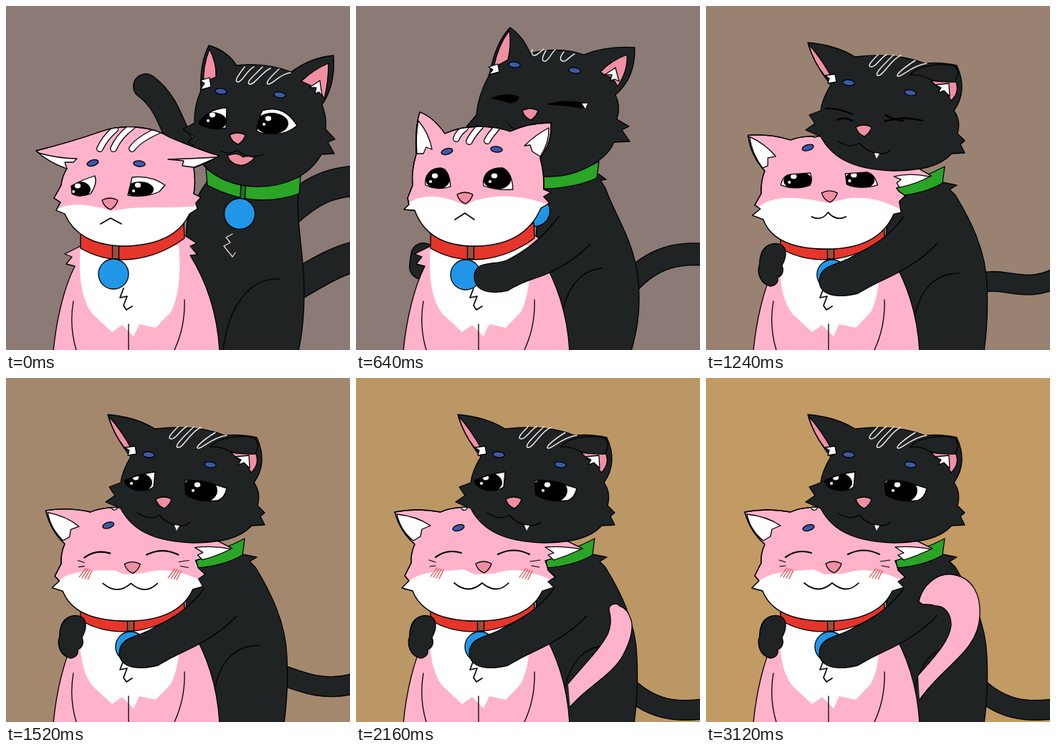
Write an HTML page with a canvas that moves like this. It is 480 px wide and 480 px high and loops after 3.2 s.

```html
<!DOCTYPE html>
<html lang="en">
<head>
<meta charset="utf-8">
<title>Cat hug</title>
<style>
html, body { margin: 0; width: 100%; height: 100%; overflow: hidden; }
canvas { display: block; width: 100vw; height: 100vh; object-fit: contain; }
</style>
</head>
<body>
<canvas id="stage" width="480" height="480"></canvas>
<script>
const g = document.getElementById('stage').getContext('2d');
const LOOP = 3200;
const PINK = '#ffb3ca', ROSE = '#f08fa3', INK = '#1f2324', WHITE = '#fff', LINE = '#000',
  RED = '#e6352a', GREEN = '#2aa526', BLUE = '#2196e8', BROW = '#3c59a8';
const NUM = /-?\d+(\.\d+)?/g;
const HUG = [0, 320, 640, 1160];       // poses of the black cat
const CHEER = [520, 640, 1160, 1720];  // poses of the pink cat
let t = 0;

const smooth = x => x * x * (3 - 2 * x);
const span = (a, b) => Math.min(1, Math.max(0, (t - a) / (b - a)));

// Blends the pose strings, number by number, at the current time.
function pose(times, ...forms) {
  let i = 0;
  while (i < times.length - 2 && t > times[i + 1]) i++;
  const k = smooth(span(times[i], times[i + 1]));
  const to = forms[i + 1].match(NUM);
  let n = 0;
  return forms[i].replace(NUM, v => ' ' + (+v + (to[n++] - v) * k).toFixed(2));
}
const hug = (...forms) => pose(HUG, ...forms);
const cheer = (...forms) => pose(CHEER, ...forms);
const nums = s => s.match(NUM).map(Number);

function shape(d, fill, line = LINE, width = 1.3) {
  const p = new Path2D(d);
  if (fill) { g.fillStyle = fill; g.fill(p); }
  if (line) { g.strokeStyle = line; g.lineWidth = width; g.stroke(p); }
}
const stroke = (d, color = LINE, width = 1.3) => shape(d, null, color, width);
function band(d, width, fill) {
  stroke(d, LINE, width);
  stroke(d, fill, width - 2.6);
}
function oval(x, y, rx, ry, fill, line, tilt = 0) {
  g.beginPath();
  g.ellipse(x, y, rx, ry, tilt, 0, 7);
  g.fillStyle = fill;
  g.fill();
  if (line) { g.strokeStyle = line; g.lineWidth = 1.3; g.stroke(); }
}
function inside(d, draw) {
  g.save();
  g.clip(new Path2D(d));
  draw();
  g.restore();
}
function shifted(x, y, draw) {
  g.save();
  g.translate(x, y);
  draw();
  g.restore();
}
function eye(lens, x, y, rx, ry, hx, hy) {
  inside(lens, () => {
    shape(lens, WHITE, null);
    oval(x, y, rx, ry, LINE);
    oval(hx, hy, 4.2, 3.4, WHITE);
    oval(hx - 6, hy + 8, 2.1, 2.1, WHITE);
  });
  stroke(lens);
}
const nose = (x, y) =>
  shape(`M${x - 11} ${y - 4}q11-6 22 0q-2 8-10 13q-9-3-12-13z`, ROSE);
function brow(place, tilt) {
  const [x, y] = nums(place);
  oval(x, y, 8.2, 4, BROW, LINE, tilt);
}

function blackBody() {
  band(hug('M195 112C220 130 228 155 245 195', 'M86 246C120 240 150 245 200 270',
    'M94 348C93 355 92 360 92 364', 'M94 350C93 355 92 360 92 366'), 36, INK);
  const w = nums(hug('43', '33', '32', '29'))[0];
  const tail = pose([0, 320, 640, 1240, 1760, 2200],
    'M395 395C430 375 460 355 490 349C540 340 560 250 500 243C460 245 430 250 380 300',
    'M385 402C420 377 445 371 500 380C540 380 560 390 580 390C580 390 580 390 580 390',
    'M380 388C415 350 450 342 500 348C540 348 560 350 580 350C580 350 580 350 580 350',
    'M370 392C410 370 440 405 490 379C540 360 560 350 580 350C580 350 580 350 580 350',
    'M370 422C410 466 450 467 490 461C540 457 560 450 580 450C580 450 580 450 580 450',
    'M370 422C410 466 450 467 490 461C540 457 560 450 580 450C580 450 580 450 580 450');
  band(tail, w, INK);
  if (t < 200) arm();
  shape(hug(
    'M284 240L408 250L410 252L409 256L408 260C405 290 412 330 415 370C418 420 414 455 408 482L270 482C250 400 250 320 253 300Q262 270 284 240Z',
    'M265 250L393 258L419 263L408 264L412 268C405 280 400 330 408 370C414 420 411 455 406 482L270 482C250 400 245 320 240 300Q250 270 265 250Z',
    'M262 240L335 232L349 242L341 243L348 254C360 290 390 330 394 385C398 430 390 460 384 482L270 482C250 400 250 320 253 300Q255 270 262 240Z',
    'M262 240L330 246L350 250L340 256L348 264C367 295 391 340 392 390C394 430 391 460 388 482L270 482C250 400 250 320 253 300Q255 270 262 240Z'), INK);
  stroke(hug('M303 480C310 420 340 378 382 381', 'M300 475C305 420 335 374 374 376',
    'M288 430C295 390 315 368 344 366', 'M292 430C300 395 320 373 353 373'));
  stroke(hug('M316 318L307 323L313 330L304 335L316 350L320 344',
    'M302 328L294 334L299 339L292 344L303 356L305 350',
    'M260 328L252 334L257 339L250 344L261 356L263 350',
    'M240 328L232 334L237 339L230 344L241 356L243 350'), '#ddd', 1.3);
  shape(hug('M279 227Q340 268 411 238L409 262Q345 284 281 250Z',
    'M263 241Q320 278 395 250L391 266Q330 292 266 262Z',
    'M262 238Q300 238 339 217L336 240Q305 254 262 255Z',
    'M265 246Q300 242 333 224L330 247Q305 262 266 265Z'), GREEN);
  const strap = hug('M331 252L330 269', 'M311 263L310 278', 'M250 240L249 258', 'M240 248L239 264');
  stroke(strap, LINE, 8);
  stroke(strap, '#187a22', 5);
  const [x, y] = nums(hug('326 290', '314 300', '249 286', '230 300'));
  oval(x, y, 21.5, 21.5, BLUE, LINE);
}

function blackFace() {
  const [x, y] = nums(hug('323 184', '308 194', '243 150', '220 173'));
  if (t < 480) shifted(x - 323, y - 184, () => {
    eye('M268 164Q282 143 308 142L307 170Q285 175 268 164Z', 287, 161, 21, 13, 288, 152);
    eye('M350 173Q352 155 358 146Q388 137 406 167Q390 181 368 178Q352 178 350 173Z', 371, 164, 23, 15, 366, 157);
    if (t < 200) {
      shape('M309 209Q322 203 331 211Q340 208 347 212Q335 224 325 222Q313 220 309 209Z', ROSE);
      stroke('M299 202Q312 209 323 201Q336 215 360 207');
    } else {
      shape('M309 209Q320 210 325 203Q337 217 358 208Q352 225 345 231Q328 237 317 230Q308 222 309 209Z', ROSE);
      shape('M312 209l3 9 4-9zM345 211l-2 9-5-8zM318 230l2-8 6 11zM335 234l3-8 4 6z', WHITE, LINE, 0.8);
    }
  });
  else if (t < 900) shifted(x - 243, y - 150, () => {
    shape('M189 129Q210 120 228 127Q222 136 214 135Q202 130 189 129Z', LINE);
    shape('M268 137Q295 130 318 136Q322 140 316 142Q290 138 268 137Z', LINE);
    shape('M315 136l8 0-3 7z', WHITE, null);
    stroke('M212 164Q220 176 238 170Q250 180 266 174');
  });
  else shifted(x - 220, y - 173, () => {
    if (t < 1500) {
      stroke('M167 143Q184 142 204 151M204 160Q192 154 183 159M250 152Q264 160 275 160M250 161Q275 153 302 160', LINE, 2.4);
    } else {
      eye('M165 143Q185 134 208 131L206 152Q198 158 186 157Q168 155 165 143Z', 183, 146, 21, 14, 181, 139);
      eye('M250 143Q275 141 295 150L308 154Q305 168 295 171Q265 174 251 163Q249 152 250 143Z', 270, 157, 25, 18, 267, 149);
    }
    stroke('M183 188Q201 200 214 191Q226 206 246 206Q254 205 257 201');
    shape('M235 205l3 8 4-7z', WHITE, null);
  });
  nose(x, y);
}

function blackHead() {
  shape(hug(
    'M272 118Q270 80 283 55Q308 62 322 83Q360 78 398 92Q425 72 457 69Q460 110 441 138Q448 155 446 172L459 186L449 190L458 206L440 207C425 235 390 254 345 252C300 249 268 225 262 195L254 190L262 182L247 172L263 163Q262 140 272 118Z',
    'M258 130Q260 85 275 64Q298 72 310 97Q345 90 384 104Q415 82 451 77Q452 120 427 150Q434 165 432 185L447 196L437 203L446 214L427 217C410 248 375 264 330 262C290 260 262 240 255 200L243 186L248 181L226 173L247 168Q248 150 258 130Z',
    'M186 96Q195 50 215 30Q233 42 243 66Q285 56 318 68Q350 55 389 58Q390 100 362 124Q370 140 364 158L381 168L371 173L382 189L360 190C350 215 310 238 270 238C215 235 195 215 180 190L164 182L170 175L152 171L168 152Q170 125 186 96Z',
    'M174 110Q150 80 142 51Q180 54 208 71Q265 64 305 80Q330 78 350 83Q366 118 346 146Q356 160 351 178L361 188L355 193L361 205L343 206C325 225 300 229 262 230C215 229 178 217 160 182L139 173L152 164L144 152L160 146Q162 130 174 110Z'), INK);
  shape(hug('M284 60Q294 80 293 99L283 103L276 112Q274 85 284 60Z',
    'M275 68Q280 95 277 112L268 116L260 124Q262 92 275 68Z',
    'M214 34Q217 55 212 75L203 80L192 86Q198 55 214 34Z',
    'M143 53Q160 72 174 97L172 100L166 98Q150 78 143 53Z'), ROSE);
  shape(hug('M284 100l-13 4l6 4l-6 9l15 -4z', 'M266 113l-13 4l6 4l-6 9l15 -4z',
    'M198 81l-13 4l6 4l-6 7l15 -4z', 'M180 95l-14 2l6 4l-2 7l12 -2z'), WHITE);
  shape(hug('M450 80Q430 88 412 105L428 112L437 116L444 130Q450 105 450 80Z',
    'M440 90Q420 100 404 115L414 122L422 128L430 140Q440 115 440 90Z',
    'M378 68Q356 76 341 92L350 98L358 100L365 112Q380 90 378 68Z',
    'M348 104Q330 106 314 104L322 112L335 120L342 132Q355 120 348 104Z'), ROSE);
  shape(hug('M438 104l-15 10l10 0l-2 8l6 -2l4 6z', 'M424 118l-15 10l10 0l-2 8l6 -2l4 6z',
    'M362 86l-15 10l10 0l-2 8l6 -2l6 3z', 'M339 108l-19 2l8 4l-4 7l8 -3l8 8z'), WHITE);
  if (t > 900) shape('M285 96C296 82 330 79 347 84C354 92 352 99 347 106Q318 107 306 99Q295 95 285 96Z', INK);
  stroke(hug(
    'M333 85c-11 14 -15 21 -9 21s13 -18 22 -21M358 85c-14 14 -24 22 -18 24s18 -18 29 -22M381 88c-13 12 -20 20 -15 21s17 -15 31 -16',
    'M318 97c-11 14 -15 20 -9 20s13 -17 22 -20M343 97c-14 14 -24 21 -18 22s18 -18 29 -20M366 100c-13 12 -20 20 -15 21s17 -15 31 -16',
    'M246 61c-2 6 1 10 6 7s6 -5 10 -8M265 62c-6 10 -6 16 -1 15s8 -11 14 -16M290 64c-6 7 -6 12 -1 13s9 -7 16 -10',
    'M240 68c-10 10 -16 17 -9 17s13 -14 21 -17M262 68c-16 16 -28 27 -22 29s19 -24 32 -28M292 76c-16 10 -29 21 -24 22s19 -15 40 -18'), '#e8e8e8', 1.5);
  brow(hug('300 119', '288 121', '221 82', '199 107'), 0.1);
  brow(hug('382 124', '370 127', '305 90', '285 121'), 0.15);
  blackFace();
}

function pinkBody() {
  const left = 'M104 335L82 346L92 350L84 360L96 363C80 395 70 440 66 482';
  const right = 'C295 430 280 385 257 348L267 347L257 335L266 331L249 320';
  shape(left + 'L298 482' + right, PINK);
  shape('M104 336C100 385 108 415 122 431L148 455L162 445L178 461L186 444L209 449L230 427C243 402 244 365 241 334Z', WHITE, null);
  stroke('M94 412C90 435 92 460 98 480M171 444L171 480M249 410C250 440 242 465 235 480');
  stroke('M164 394L159 407L169 405L164 418L168 424L176 419', LINE, 1.7);
  shape('M104 317C140 336 205 338 248 302L249 324C200 360 145 362 104 338Z', RED);
  const [strap, x, y] = nums(cheer('153 150 374', '160 153 375', '174 176 375', '174 173 375'));
  shape(`M${strap - 4.5} 334h9v19h-9z`, '#95523f');
  oval(x, y, 21, 21, BLUE, LINE);
}

function pinkFace() {
  const [x, y] = nums(cheer('145 275', '152 267', '172 265', '178 263'));
  if (t < 580) shifted(x - 145, y - 275, () => {
    eye('M91 251Q107 242 124 237Q128 248 118 262Q102 268 92 262Z', 103, 256, 15, 11, 100, 251);
    eye('M170 264L176 239Q202 236 222 250L214 259Q195 268 170 264Z', 187, 256, 19, 11, 184, 250);
    stroke('M132 304L146 296L161 304', LINE, 1.7);
  });
  else if (t < 900) shifted(x - 152, y - 267, () => {
    eye('M97 250C95 235 105 226 118 226Q130 227 132 252Q114 258 97 250Z', 114, 241, 17, 15, 110, 237);
    eye('M178 251C175 232 190 225 205 226Q218 232 219 256Q197 258 178 251Z', 197, 240, 20, 16, 193, 237);
    stroke('M138 298L152 289L165 298', LINE, 1.7);
  });
  else if (t < 1500) shifted(x - 172, y - 265, () => {
    eye('M104 250Q107 236 118 235L145 233Q149 243 145 250Q125 258 104 250Z', 128, 244, 20, 13, 122, 238);
    eye('M194 234L224 232Q235 234 239 250Q214 257 196 249Z', 214, 243, 21, 13, 206, 236);
    stroke('M147 294Q161 301 170 288Q181 301 195 294', LINE, 1.7);
  });
  else shifted(x - 178, y - 263, () => {
    stroke('M111 250Q127 238 147 244M198 246Q220 235 242 246', LINE, 2.2);
    stroke('M102 254l9 3M103 263l8-1M243 256l14-2M245 262l11 2', LINE, 1.1);
    for (const [bx, by] of [[104, 277], [228, 278]])
      for (let i = 0; i < 4; i++) stroke(`M${bx + i * 4} ${by + i}l${9 - i}-12`, '#e0463f', 1.2);
    stroke('M137 286Q157 303 176 286Q196 303 213 286', LINE, 1.7);
  });
  nose(x, y);
}

function pinkHead() {
  const head = cheer(
    'M85 227Q60 218 42 202Q90 190 133 175C165 164 205 168 228 183Q275 203 298 209Q285 217 262 226Q265 245 262 262L272 267L265 275L267 283L256 290Q235 335 160 335Q100 332 82 290L70 285L76 274L67 268L77 250Q78 238 85 227Z',
    'M84 207Q82 170 89 148Q108 155 124 178C150 166 185 165 215 175Q240 163 272 163Q274 190 257 212Q263 235 262 256L272 260L262 266L270 275L258 282Q235 335 165 335Q100 335 82 285L67 284L74 277L72 268L79 250Q77 230 84 207Z',
    'M82 230Q62 208 59 180Q90 178 118 187C140 178 200 178 240 205Q285 218 314 237Q290 245 266 254Q268 256 269 258L278 264L270 272L272 288L262 290Q240 340 165 339Q95 338 80 298L65 292L76 283L68 278L77 262Q76 245 82 230Z',
    'M82 232Q62 215 54 187Q85 181 118 187C140 176 200 176 240 205Q285 222 316 238Q290 247 264 255Q267 262 268 268L278 278L268 284L276 292L260 297Q240 340 165 339Q95 338 79 297L64 293L74 283L68 276L77 258Q76 245 82 232Z');
  shape(head, PINK);
  inside(head, () => {
    shape(cheer('M60 290C90 270 110 278 135 282L146 286L160 284C190 278 230 284 275 278L275 350L60 350Z',
      'M60 290C80 258 115 264 140 273L152 278L165 272C195 262 235 262 280 282L280 350L60 350Z',
      'M60 295C80 262 120 266 150 271L170 275L190 270C220 264 250 270 282 290L282 350L60 350Z',
      'M60 297C84 264 125 271 150 267L165 274L192 273C215 266 235 264 282 286L282 350L60 350Z'), WHITE, null);
    band(cheer('M131 199Q138 184 152 172M150 199Q158 181 176 168M176 199Q185 186 212 174',
      'M140 185Q142 178 152 170M158 189Q162 180 174 167M183 188Q187 180 199 167',
      'M152 179Q153 177 160 168M175 185Q180 180 190 165M200 185Q205 180 215 165',
      'M151 180Q153 177 160 168M175 185Q180 180 190 165M200 185Q205 180 215 165'), 10, WHITE);
  });
  stroke(head);
  shape(cheer('M45 205Q75 213 99 213L94 218L82 218L85 227Q62 219 45 205Z',
    'M87 160Q102 178 106 200L98 197L94 206L85 206Q83 180 87 160Z',
    'M61 182Q82 192 97 210L86 212L86 223L79 226Q64 206 61 182Z',
    'M57 190Q85 193 104 206L92 211L90 221L80 227Q62 213 57 190Z'), WHITE);
  shape(cheer('M294 211Q260 213 226 214L248 216L246 223L262 225Q282 217 294 211Z',
    'M269 170Q250 180 235 195L243 194L246 203L257 210Q270 190 269 170Z',
    'M312 238Q285 232 262 238L272 242L266 247L270 253Q295 248 312 238Z',
    'M314 239Q290 234 264 236L276 244L268 247L276 254Q295 248 314 239Z'), WHITE);
  brow(cheer('121 219', '127 203', '142 197', '143 209'), -0.3);
  brow(cheer('186 220', '196 200', '210 196', '210 206'), 0.1);
  pinkFace();
}

function arm() {
  shape(hug(
    'M350 290C370 305 380 325 380 342C375 360 350 370 350 390C352 405 370 408 380 400C395 372 395 345 395 335C390 310 385 280 380 268',
    'M383 288C400 305 412 325 406 342C400 360 372 370 378 390C382 408 400 408 415 400C450 372 456 345 456 335C450 305 430 262 393 262',
    'M283 294C255 330 230 345 210 355C190 362 165 355 165 378C166 400 190 402 212 397C240 380 250 382 270 372C295 360 315 345 327 332',
    'M276 294C250 330 220 340 200 352C180 362 158 362 158 385C160 405 185 408 212 401C240 384 250 382 268 372C290 360 310 345 322 332'), INK);
}

function pinkTail() {
  shape(pose([1560, 1800, 2060, 2320, 2640, 3120],
    'M297 492C310 488 335 487 352 488C380 490 393 495 393 510C393 522 366 522 366 512C366 510 360 505 345 500C335 500 325 502 318 505C312 508 305 510 300 512',
    'M297 452C310 425 335 407 352 408C380 410 393 440 393 480C393 492 368 492 368 484C366 472 360 460 347 452C336 449 326 454 318 461C312 467 305 474 300 484',
    'M296 432C318 402 335 385 350 365C358 352 360 340 362 330C366 318 390 312 396 325C402 340 400 355 395 370C388 385 375 400 360 415C340 430 315 445 299 464',
    'M296 416C322 390 350 367 354 342C354 327 347 317 336 314C324 309 312 314 313 305C318 280 340 267 360 269C388 273 400 300 398 330C395 382 335 404 298 449',
    'M296 415C318 388 342 365 344 340C344 325 335 316 322 317C310 312 304 318 300 311C305 285 325 270 345 271C375 275 388 300 386 330C384 380 330 400 298 447',
    'M296 415C318 390 340 367 342 345C342 328 333 318 320 318C308 313 302 320 297 311C303 288 322 273 342 274C372 277 384 303 382 332C380 382 330 402 298 449'), PINK);
}

function draw() {
  const k = span(860, 2320);
  const [r, gr, b] = [[140, 193], [122, 154], [119, 100]].map(([a, z]) => a + (z - a) * k);
  g.fillStyle = `rgb(${r},${gr},${b})`;
  g.fillRect(0, 0, 480, 480);
  const nuzzle = t > 900;
  blackBody();
  if (!nuzzle) blackHead();
  pinkBody();
  pinkHead();
  if (t >= 200) arm();
  if (nuzzle) {
    blackHead();
    shape('M105 333C85 326 74 345 75 360C70 372 76 388 90 391C99 390 101 384 100 379C107 376 109 369 106 362C113 350 113 338 105 333Z', INK);
  }
  if (t > 1560) pinkTail();
}

g.lineCap = g.lineJoin = 'round';
const start = performance.now();
function frame() {
  t = (performance.now() - start) % LOOP;
  draw();
  requestAnimationFrame(frame);
}
frame();
</script>
</body>
</html>
```
